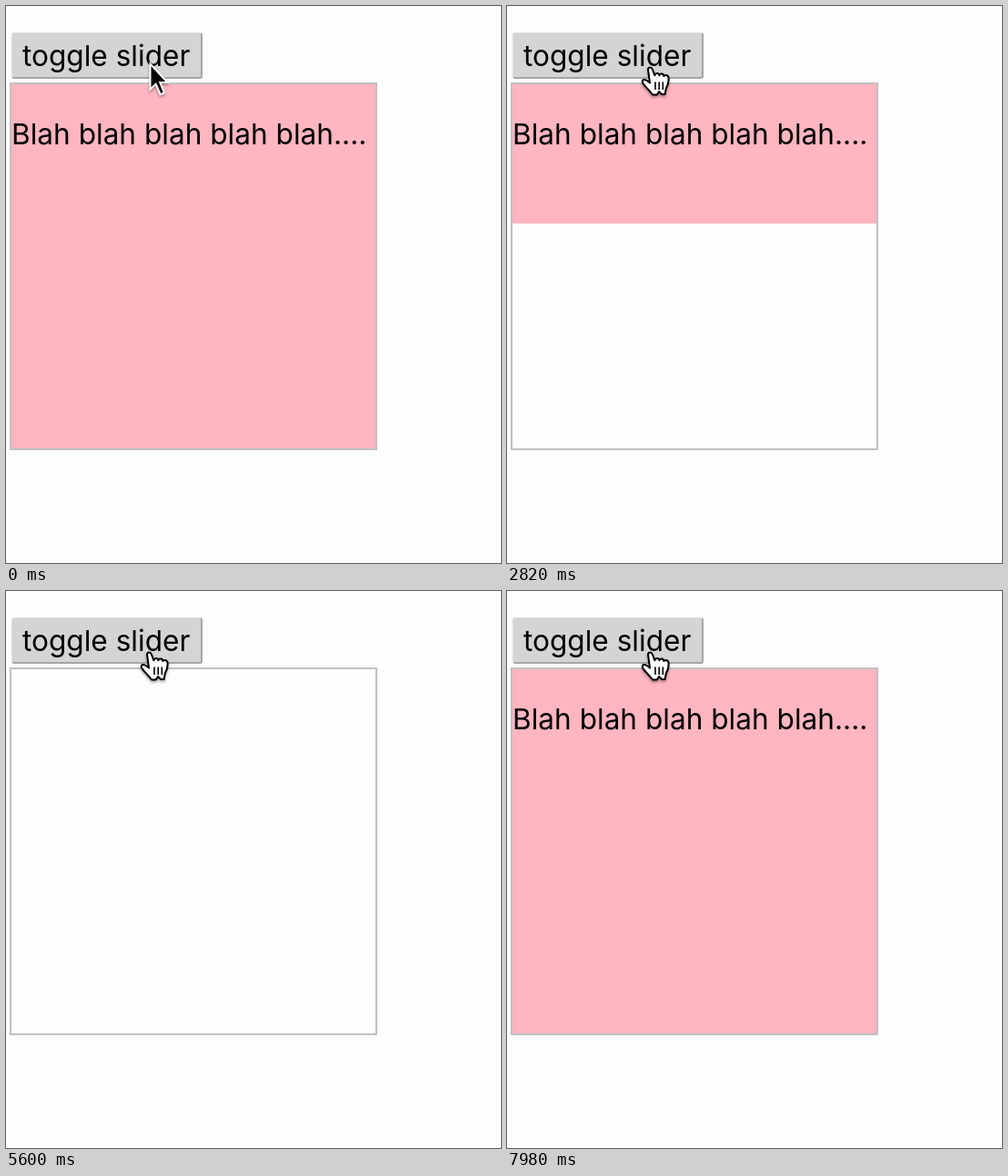
Recreate the animation shown at these times as an HTML page. Size 544 px wide and 612 px high, loop 8 s.

```html
<!DOCTYPE html>
<html lang="en">
<head>
<meta charset="utf-8">
<title>Toggle slider</title>
<style>
  html, body {
    margin: 0;
    width: 100%;
    height: 100%;
    overflow: hidden;
    background: #fdfdfd;
  }
  .stage {
    position: relative;
    width: 544px;
    height: 612px;
    overflow: hidden;
    font: 400 31.6px/38px Inter, "Noto Sans", sans-serif;
    color: #000;
    white-space: nowrap;
  }
  .stage * { box-sizing: border-box; }
  .button, .frame, .panel, .label, .cursors { position: absolute; }
  .button {
    left: 6px;
    top: 29px;
    width: 210px;
    height: 51px;
    background: #d4d4d5;
    border: solid;
    border-width: 1px 2px 2px 1px;
    border-color: #dedede #a6a6a6 #a6a6a6 #dedede;
    border-radius: 3px;
  }
  .frame {
    left: 4px;
    top: 84px;
    width: 404px;
    height: 404px;
    border: 2px solid #c0c0c0;
  }
  .panel {
    left: 0;
    top: 0;
    width: 400px;
    height: 400px;
    overflow: hidden;
    background: #ffb6c1;
    animation: slide 8s infinite;
  }
  .button .label { left: 11px; top: 6px; }
  .panel .label { left: 0; top: 36px; }
  .cursors {
    left: 0;
    top: 0;
    filter: drop-shadow(0 2px 1.5px rgba(0, 0, 0, .35));
  }
  .arrow { animation: arrow 8s step-end infinite; }
  .hand { animation: hand 8s step-end infinite; }

  @keyframes slide {
    0% { height: 400px; }
    32.16% { height: 400px; animation-timing-function: cubic-bezier(.16, 1, .3, 1); }
    54.41% { height: 0; }
    75.03% { height: 0; animation-timing-function: cubic-bezier(.16, 1, .3, 1); }
    97.28%, 100% { height: 400px; }
  }
  @keyframes arrow {
    0% { visibility: visible; }
    31.25%, 100% { visibility: hidden; }
  }
  @keyframes hand {
    0% { visibility: hidden; }
    31.25%, 100% { visibility: visible; }
  }
</style>
</head>
<body>
<div class="stage">
  <div class="button"><span class="label">toggle slider</span></div>
  <div class="frame">
    <div class="panel"><span class="label">Blah blah blah blah blah....</span></div>
  </div>
  <svg class="cursors" width="544" height="612" viewBox="0 0 544 612">
    <path class="arrow" fill="#000" stroke="#fff" stroke-width="2" stroke-linejoin="miter"
      d="M158.5 63.5V91.5L164.7 85.6L169.6 97.2L174 95.3L169.2 84H177.5Z"/>
    <g class="hand" stroke="#000" stroke-width="2" stroke-linejoin="round" stroke-linecap="round">
      <path fill="#fff" d="M155 69.5C155.5 66.8 158.8 66.8 159.8 69.5L162.3 76.2
        C163.3 73.3 167 73.5 167.3 76.2C168.5 73.6 172 74 172.3 77
        C174 75.2 177.6 76 177.6 79C178 84 176.6 87.5 174.8 90.5L173.6 97
        H170.2L167 94L164.8 97.5H160C157 93.5 153.5 90 150.5 86.5
        C148.4 84 148.2 81.5 150 81C152.5 80.4 155 82.5 157 84.5Z"/>
      <path fill="none" stroke-width="1.6" d="M163 84V91.5M167.2 84V91.5M171.3 84V91.5"/>
    </g>
  </svg>
</div>
</body>
</html>
```
